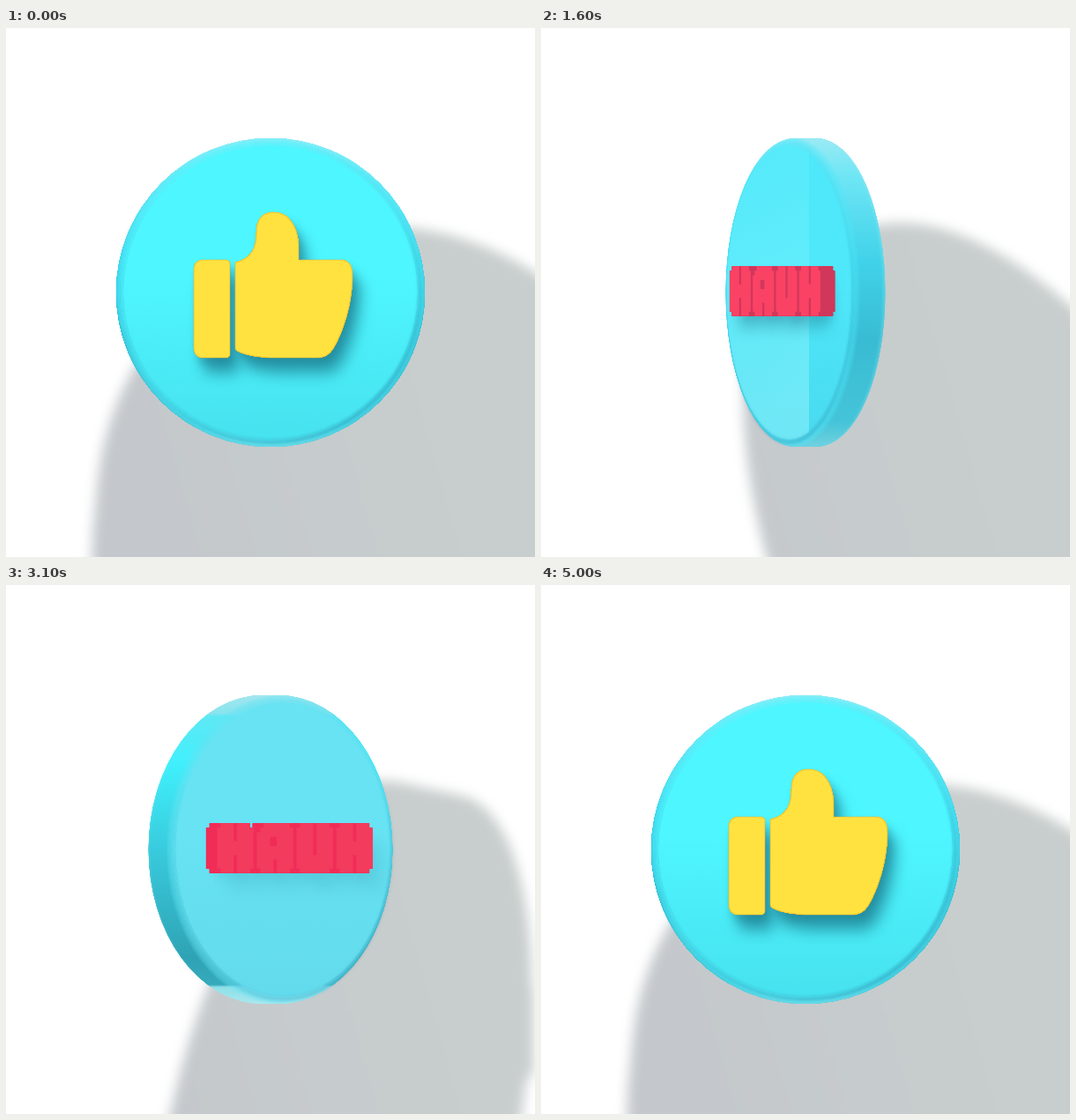
These frames come from a looping animation (600x600 px, 5.1 s). An HTML page with a canvas:

```html
<!DOCTYPE html>
<html lang="en">
<head>
<meta charset="utf-8">
<title>Spinning badge</title>
<style>
html, body { margin: 0; width: 100%; height: 100%; overflow: hidden; background: #fff; }
canvas { display: block; width: 600px; height: 600px; }
</style>
</head>
<body>
<canvas id="stage" width="600" height="600"></canvas>
<script>
const ctx = document.getElementById('stage').getContext('2d');
const shade = document.createElement('canvas');
shade.width = shade.height = 760;
const sctx = shade.getContext('2d');

const CX = 300, CY = 300, R = 175, HALF = 20.5, BEVEL = 8;
const THUMB_Z = 49.5, TEXT_Z = 39, PIXEL = 5.15;
const LIGHT = { x: -148, y: -295, z: 415, wall: 797 };
const MARGIN = 80;

const clamp = (v, a = 0, b = 1) => Math.min(b, Math.max(a, v));
const rgb = c => `rgb(${c.map(Math.round).join()})`;
const mix = (a, b, k) => a.map((v, i) => v + (b[i] - v) * clamp(k));

// Outline as points relative to the disc centre; steps are lines or cubic curves.
function outline(start, steps) {
  const pts = [start];
  for (const s of steps) {
    const [x0, y0] = pts[pts.length - 1];
    if (s.length === 2) { pts.push(s); continue; }
    for (let i = 1; i <= 12; i++) {
      const t = i / 12, u = 1 - t;
      const at = (p, a, b, c) => u * u * u * p + 3 * u * u * t * a + 3 * u * t * t * b + t * t * t * c;
      pts.push([at(x0, s[0], s[2], s[4]), at(y0, s[1], s[3], s[5])]);
    }
  }
  return pts.map(([x, y]) => [x - CX, y - CY]);
}

const wrist = outline([225, 263], [[249, 263], [252, 263, 254, 265, 254, 268], [254, 369],
  [254, 372, 252, 374, 249, 374], [225, 374], [217, 374, 213, 370, 213, 361],
  [213, 276], [213, 267, 217, 263, 225, 263]]);
const hand = outline([260, 266], [[278, 262, 284, 250, 284, 232], [284, 216, 292, 209, 304, 209],
  [322, 209, 332, 228, 332, 250], [332, 263], [378, 263], [390, 263, 393, 270, 393, 284],
  [392, 315, 382, 345, 372, 362], [366, 372, 360, 374, 350, 374], [300, 374],
  [285, 373, 272, 371, 264, 367], [261, 366, 260, 364, 260, 360]]);

function toPath(polys) {
  const path = new Path2D();
  for (const poly of polys) {
    poly.forEach(([x, y], i) => i ? path.lineTo(x, y) : path.moveTo(x, y));
    path.closePath();
  }
  return path;
}
const thumbPath = toPath([wrist, hand]);

const edge = '.####.####.', post = '#####.#####', full = '###########';
const GLYPHS = {
  H: [edge, post, post, post, full, full, full, post, post, post, edge],
  A: ['..########.', '.##########', full, '####..#####', '####..#####', full, full, full, post, post, edge],
  U: [edge, post, post, post, post, post, post, full, full, full, '.#########.']
};
const textWidth = 47 * PIXEL, textTop = -1.5 - 5.5 * PIXEL;

// The word sits on the back face, so it is mirrored in local space.
function wordPath(word) {
  const path = new Path2D();
  [...word].forEach((ch, n) => GLYPHS[ch].forEach((row, y) => {
    for (const run of row.matchAll(/#+/g)) {
      const left = -textWidth / 2 + 1.5 + (n * 12 + run.index) * PIXEL;
      const w = run[0].length * PIXEL;
      path.rect(-left - w, textTop + y * PIXEL, w, PIXEL);
    }
  }));
  return path;
}
const textPath = wordPath('HAUH');
const tw = textWidth / 2;
const textBox = [[-tw, textTop], [tw, textTop], [tw, -textTop - 3], [-tw, -textTop - 3]];

const circle = Array.from({ length: 90 }, (_, i) => {
  const a = i * Math.PI / 45;
  return [R * Math.cos(a), R * Math.sin(a)];
});

function vertical(stops) {
  const g = ctx.createLinearGradient(0, -R, 0, R);
  stops.forEach(([at, c]) => g.addColorStop(at, c));
  return g;
}
const rimBright = vertical([[0, '#a5e6ee'], [.06, '#86e4ee'], [.068, '#5ee8f4'], [.22, '#40f0fc'],
  [.5, '#38cbdd'], [.85, '#2fa3b5'], [.938, '#35aabb'], [.946, '#8edfe8'], [1, '#a8e8ee']]);
const rimRight = vertical([[0, '#9aeaf4'], [.12, '#6fe6f5'], [.4, '#40d2e9'],
  [.65, '#38bcd3'], [.92, '#45c4d8'], [1, '#6fd2e0']]);
const rimPale = vertical([[0, '#a0e8f2'], [.5, '#8be2ee'], [.85, '#62cfe0'], [1, '#3dbfd6']]);

function angleAt(step) {
  const lag = 2.5 * Math.exp(-(((step - 35) / 2) ** 2));
  return (step * 7.2 - lag) * Math.PI / 180;
}

function wallShadow(c, s) {
  const project = ([x, y], z) => {
    const wx = x * c + z * s, wz = z * c - x * s;
    const k = LIGHT.wall / (LIGHT.z - wz);
    return [CX + LIGHT.x + (wx - LIGHT.x) * k, CY + LIGHT.y + (y - LIGHT.y) * k];
  };
  const sweep = (poly, z0, z1, n) => {
    for (let i = 0; i <= n; i++) {
      const z = z0 + (z1 - z0) * i / n;
      sctx.fill(toPath([poly.map(p => project(p, z))]));
    }
  };
  sctx.setTransform(1, 0, 0, 1, 0, 0);
  sctx.clearRect(0, 0, 760, 760);
  sctx.translate(MARGIN, MARGIN);
  const tone = sctx.createLinearGradient(150, 450, 500, 350);
  tone.addColorStop(0, '#c4c8cc');
  tone.addColorStop(1, '#c8cecd');
  sctx.fillStyle = tone;
  sweep(circle, -HALF, HALF, 24);
  sweep(wrist, HALF, THUMB_Z, 12);
  sweep(hand, HALF, THUMB_Z, 12);
  sweep(textBox, -HALF, -TEXT_Z, 8);
  ctx.setTransform(1, 0, 0, 1, 0, 0);
  ctx.filter = 'blur(7px)';
  ctx.drawImage(shade, -MARGIN, -MARGIN);
  ctx.filter = 'none';
}

function draw(step) {
  const a = angleAt(step), c = Math.cos(a), s = Math.sin(a);
  const side = c >= 0 ? 1 : -1;
  const tilt = s * side;
  const lit = -0.38 * tilt + c * side;
  const layer = z => ctx.setTransform(c, 0, 0, 1, CX + z * s, CY);
  const disc = r => { ctx.beginPath(); ctx.arc(0, 0, r, 0, 7); };

  ctx.setTransform(1, 0, 0, 1, 0, 0);
  ctx.fillStyle = '#fff';
  ctx.fillRect(0, 0, 600, 600);
  wallShadow(c, s);

  // Layers blend from the side colour to the front colour near the outer edge.
  function extrude(path, from, to, sideColor, frontColor, soft) {
    const depth = Math.abs(to - from), n = Math.ceil(depth * 2);
    const outer = Math.max(Math.abs(from), Math.abs(to));
    for (let i = 0; i <= n; i++) {
      const z = from + (to - from) * i / n;
      const k = 1 - (outer - Math.abs(z)) / soft;
      ctx.fillStyle = rgb(mix(sideColor, frontColor, k));
      layer(z);
      ctx.fill(path);
    }
  }

  function thumb(visible) {
    const flank = mix([176, 168, 50], [232, 200, 36], lit);
    const front = mix([251, 198, 46], [255, 226, 64], lit);
    const order = visible ? [HALF, THUMB_Z] : [THUMB_Z, HALF];
    extrude(thumbPath, ...order, flank, front, 8);
    if (visible) {
      ctx.strokeStyle = `rgba(242,174,40,${.5 * clamp(lit)})`;
      ctx.lineWidth = 1.2;
      ctx.stroke(thumbPath);
    }
  }

  function word(visible) {
    const flank = !visible ? [252, 62, 106] : tilt > 0 ? [240, 46, 88] : [208, 56, 92];
    const front = visible ? mix([232, 48, 82], [255, 72, 106], lit) : flank;
    const order = visible ? [-HALF, -TEXT_Z] : [-TEXT_Z, -HALF];
    extrude(textPath, ...order, flank, front, .5);
  }

  function body() {
    const base = lit < .85 ? mix([142, 219, 232], [72, 233, 252], lit / .85)
      : mix([72, 233, 252], [78, 247, 255], (lit - .85) / .16);
    const faceColor = rgb(base);
    const rim = tilt > .5 ? rimBright : tilt > .06 ? rimPale : rimRight;
    for (let z = -HALF; z <= HALF; z += .5) {
      const over = Math.max(0, Math.abs(z) - (HALF - BEVEL));
      layer(z * side);
      disc(R - BEVEL + Math.sqrt(BEVEL * BEVEL - over * over));
      ctx.fillStyle = rim;
      ctx.fill();
      if (!over) continue;
      ctx.globalAlpha = over / BEVEL * (z > 0 ? .8 : .45);
      ctx.fillStyle = z > 0 ? faceColor : '#a8ecf4';
      ctx.fill();
      ctx.globalAlpha = 1;
    }
    face(faceColor);
  }

  function face(color) {
    const z = HALF * side, light = clamp(lit);
    layer(z);
    ctx.save();
    disc(R - BEVEL);
    ctx.clip();
    ctx.fillStyle = color;
    ctx.fill();
    ctx.fillStyle = vertical([[0, 'rgba(0,40,90,0)'], [.45, 'rgba(0,40,90,0)'],
      [1, `rgba(0,40,90,${.1 * light})`]]);
    ctx.fill();
    reflections();
    layer(z);
    castShadow(light);
    ctx.restore();

    layer(z);
    const g = ctx.createLinearGradient(-90 * side, -130, 90 * side, 150);
    g.addColorStop(0, 'rgba(0,60,110,0)');
    g.addColorStop(.5, `rgba(0,60,110,${.06 * light})`);
    g.addColorStop(1, `rgba(0,60,110,${.06 + .18 * light})`);
    ctx.strokeStyle = g;
    ctx.lineWidth = 5;
    ctx.filter = 'blur(1.5px)';
    disc(R - BEVEL + 2.5);
    ctx.stroke();
    ctx.filter = 'none';
  }

  // Soft window reflections that slide in while the face turns to the left.
  function reflections() {
    ctx.setTransform(1, 0, 0, 1, 0, 0);
    const wide = clamp(1 - Math.abs(tilt + .85) / .18);
    if (wide) {
      const g = ctx.createLinearGradient(195, 180, 304, 420);
      g.addColorStop(0, `rgba(130,248,255,${.2 * wide})`);
      g.addColorStop(1, `rgba(160,248,255,${.62 * wide})`);
      ctx.fillStyle = g;
      ctx.fillRect(180, 120, 124, 360);
    }
    const low = clamp(1 - Math.abs(tilt + .59) / .15);
    if (low) {
      ctx.fillStyle = `rgba(190,235,250,${.22 * low})`;
      ctx.beginPath();
      ctx.moveTo(308, 412);
      ctx.lineTo(354, 400);
      ctx.lineTo(354, 480);
      ctx.lineTo(308, 480);
      ctx.fill();
    }
  }

  function castShadow(light) {
    if (lit < .12) return;
    const front = side > 0, path = front ? thumbPath : textPath;
    const h = (front ? THUMB_Z : TEXT_Z) - HALF;
    const dx = clamp((.38 * c + s) / lit, -2, 2) * h * .9;
    const dy = clamp(.72 / lit, 0, 1.2) * h * .9;
    const pass = (reach, blur, alpha) => {
      layer(HALF * side);
      ctx.translate(dx * reach, dy * reach);
      ctx.filter = `blur(${blur}px)`;
      ctx.fillStyle = `rgba(14,90,112,${alpha * light * light})`;
      ctx.fill(path);
    };
    pass(1, 8, .5);
    pass(.4, 4, .25);
    ctx.filter = 'none';
  }

  if (side > 0) { word(false); body(); thumb(true); }
  else { thumb(false); body(); word(true); }
}

let shown = -1;
function tick() {
  const step = Math.floor(performance.now() / 100) % 51;
  if (step !== shown) draw(shown = step);
  requestAnimationFrame(tick);
}
tick();
</script>
</body>
</html>
```
